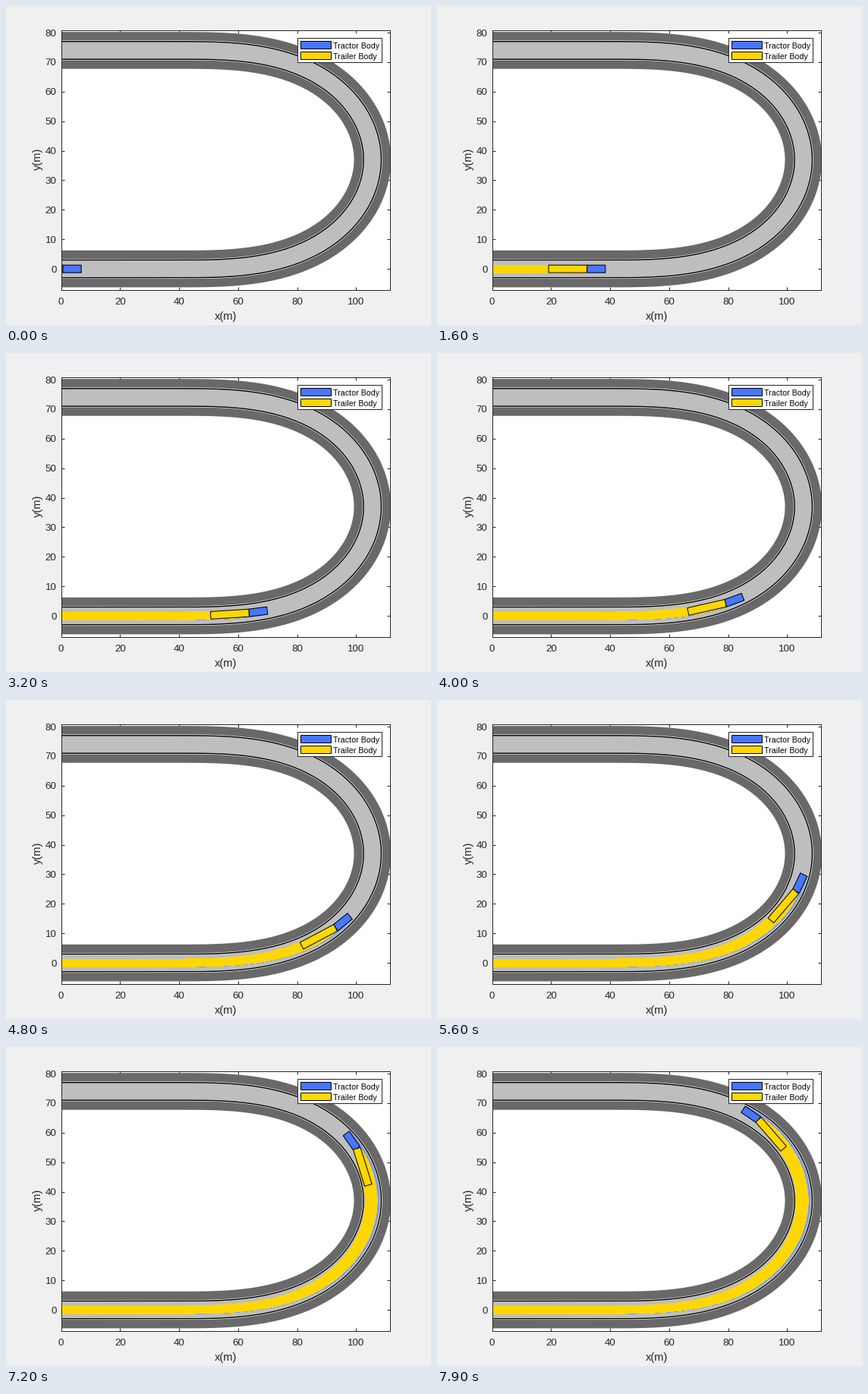
These frames come from a looping animation (560 by 420 pixels, 8000 ms). A matplotlib script:

```python
import numpy as np
import matplotlib.pyplot as plt
from matplotlib.animation import FuncAnimation
from matplotlib.collections import PolyCollection
from matplotlib.patches import Polygon, Rectangle

plt.rcParams["font.family"] = "Liberation Sans"

W, H, DPI = 560, 420, 100
FRAMES, INTERVAL = 80, 100
PX = 72 / DPI                      # one pixel in points

ROAD, SHOULDER = "#bebebe", "#696969"
BLUE, GOLD, INK = "#4876ff", "#ffd700", "#262626"
BLUE_TRAIL = "#7c9cf0"

# Axes box in pixels from the lower left, and pixels per metre
LEFT, RIGHT, BOTTOM, TOP = 72.5, 506.4, 46, 388.4
SCALE, Y_ZERO = 3.8876, 73.9

# Road: straight, clothoid in, clothoid out, straight back
STRAIGHT, SPIRAL = 39.7, 84.42
DS = 0.05
START, STEP = 0.6, 1.973           # hitch position and advance per frame
SUB = 6                            # trail steps per frame
TRACTOR, TRAILER, AXLE, HALF = 6.25, 13.0, 9.5, 1.28


def heading(s):
    u = np.clip((s - STRAIGHT) / SPIRAL, 0, 2)
    return np.where(u < 1, np.pi / 2 * u**2, np.pi - np.pi / 2 * (2 - u) ** 2)


def smooth(x, a, b):
    t = np.clip((x - a) / (b - a), 0, 1)
    return t * t * (3 - 2 * t)


def running_sum(f):
    return np.concatenate([[0], np.cumsum(f[:-1] + f[1:]) * DS / 2])


arc = np.arange(0, 2 * (STRAIGHT + SPIRAL) + 1, DS)
theta = heading(arc)
cx, cy = running_sum(np.cos(theta)), running_sum(np.sin(theta))


def offset(d):
    """Centre line shifted to the right of travel by d metres."""
    return np.column_stack([cx + d * np.sin(theta), cy - d * np.cos(theta)])


def band(d0, d1):
    return np.vstack([offset(d0), offset(d1)[::-1]])


# The hitch drifts outwards in the bend; the trailer lags behind it
drift = 0.43 * smooth(arc, 60, 90) + 0.22 * smooth(arc, 125, 157)
hitch = offset(drift)
trail_dir = np.zeros_like(arc)
for i in range(1, len(arc)):
    lag = theta[i - 1] - trail_dir[i - 1]
    trail_dir[i] = trail_dir[i - 1] + DS * np.sin(lag) / AXLE


def body(x, y, ang, rear, front):
    c, s = np.cos(ang), np.sin(ang)
    box = [(rear, -HALF), (front, -HALF), (front, HALF), (rear, HALF)]
    return np.array([(x + a * c - b * s, y + a * s + b * c) for a, b in box])


def pose(k):
    s = START + STEP * k
    x, y, ang, tail = (np.interp(s, arc, v)
                       for v in (hitch[:, 0], hitch[:, 1], theta, trail_dir))
    return body(x, y, ang, 0, TRACTOR), body(x, y, tail, -TRAILER, 0)


tractors, trailers = zip(*(pose(j / SUB) for j in range(FRAMES * SUB)))

fig = plt.figure(figsize=(W / DPI, H / DPI), dpi=DPI, facecolor="#f0f0f0")
ax = fig.add_axes([LEFT / W, BOTTOM / H, (RIGHT - LEFT) / W, (TOP - BOTTOM) / H])
ax.set(xlim=(0, (RIGHT - LEFT) / SCALE),
       ylim=((BOTTOM - Y_ZERO) / SCALE, (TOP - Y_ZERO) / SCALE),
       xticks=range(0, 101, 20), yticks=range(0, 81, 10))
ax.set_axisbelow(True)
ax.tick_params(direction="in", top=True, right=True, length=4.3 * PX,
               width=PX, color=INK, labelsize=13.33 * PX, labelcolor=INK)
ax.tick_params(axis="x", pad=10 * PX)
ax.tick_params(axis="y", pad=6 * PX)
for spine in ax.spines.values():
    spine.set(color=INK, linewidth=PX)

for side in (-1, 1):
    ax.add_patch(Polygon(band(3.35 * side, 6.25 * side), fc=SHOULDER, lw=0, zorder=1))
ax.add_patch(Polygon(band(-3, 3), fc=ROAD, lw=0, zorder=1.1))
for side in (-1, 1):
    ax.plot(*offset(3 * side).T, color="black", lw=1.4 * PX, zorder=1.2)


def trail(color, z):
    coll = PolyCollection([], facecolors=color, edgecolors="none",
                          antialiaseds=False, snap=False, zorder=z)
    return ax.add_collection(coll, autolim=False)


def vehicle(color, z):
    return ax.add_patch(Polygon(tractors[0], fc=color, ec="black", lw=PX,
                                snap=False, zorder=z))


blue_trail, gold_trail = trail(BLUE_TRAIL, 1.5), trail(GOLD, 1.6)
tractor, trailer = vehicle(BLUE, 1.7), vehicle(GOLD, 1.8)

# Overlay in pixels, y down, for labels and legend
top = fig.add_axes([0, 0, 1, 1])
top.set(xlim=(0, W), ylim=(H, 0))
top.axis("off")


def label(x, y, text, size, color, **kw):
    top.text(x, y, text, fontsize=size * PX, color=color, **kw)


def box(x0, y0, x1, y1, fill, edge):
    top.add_patch(Rectangle((x0, y0), x1 - x0, y1 - y0, fc=fill, ec=edge,
                            lw=PX, snap=False))


label(289.8, 412.5, "x(m)", 14.67, INK, ha="center")
label(48.5, 201.5, "y(m)", 14.67, INK, ha="right", va="center", rotation=90)

box(384.5, 42.5, 495.5, 74.5, "white", INK)
for y, color, text in ((51.5, BLUE, "Tractor Body"), (65.5, GOLD, "Trailer Body")):
    box(388.5, y - 5, 428.5, y + 5, color, "black")
    label(431, y + 4, text, 10.67, "black")


def draw(k):
    now = k * SUB
    blue_trail.set_verts(tractors[:now + 1])
    gold_trail.set_verts(trailers[:now + 1])
    tractor.set_xy(tractors[now])
    trailer.set_xy(trailers[now])
    return blue_trail, gold_trail, tractor, trailer


anim = FuncAnimation(fig, draw, frames=FRAMES, interval=INTERVAL,
                     repeat=True, repeat_delay=0)
plt.show()
```
